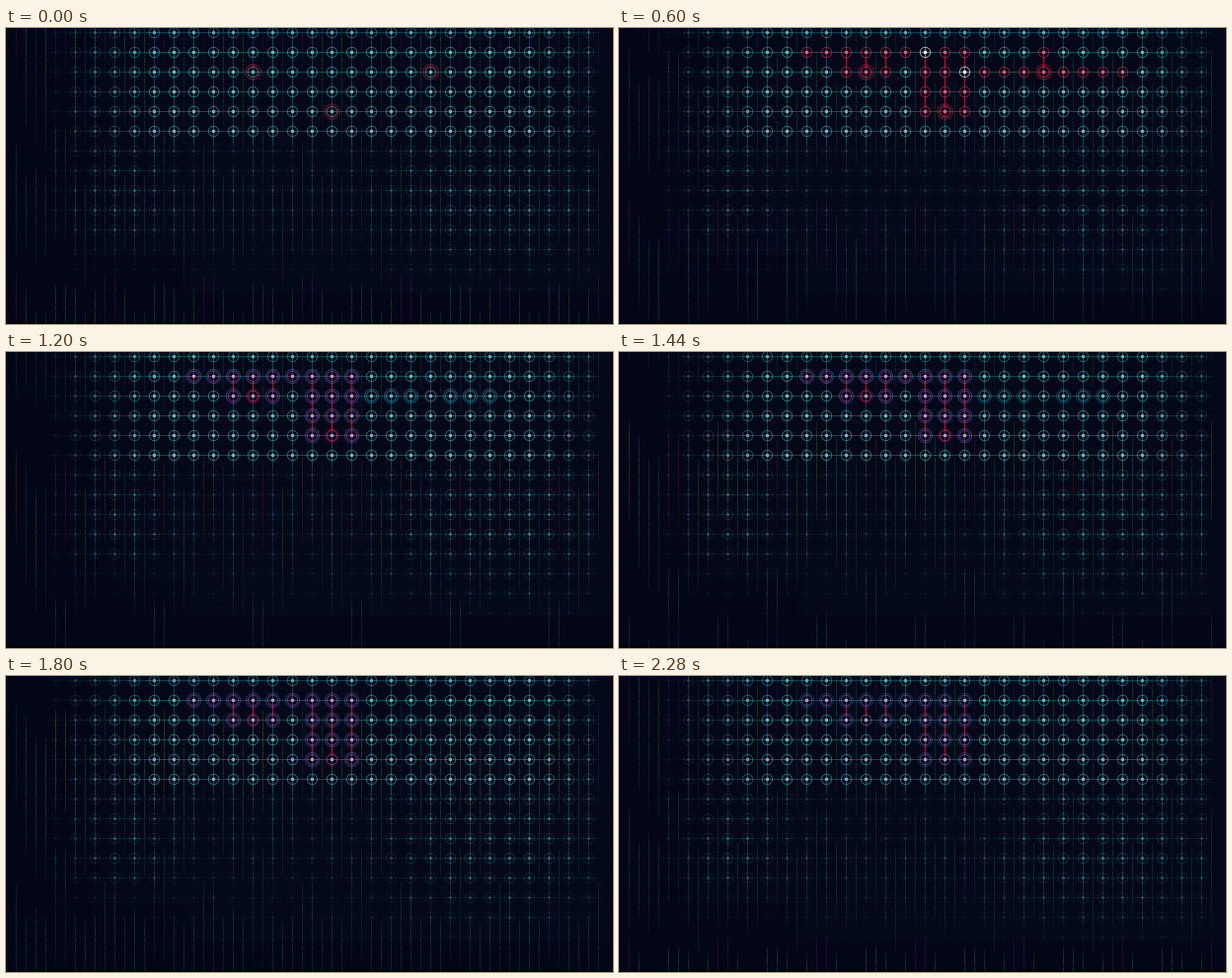
These frames come from a looping animation (984 px wide and 480 px high, 2.4 s). An HTML page with a canvas:

```html
<!DOCTYPE html>
<html lang="en">
<head>
<meta charset="utf-8">
<title>Signal grid</title>
<style>
  html, body { margin: 0; width: 100%; height: 100%; overflow: hidden; background: #030616; }
  canvas { display: block; width: 984px; height: 480px; }
</style>
</head>
<body>
<canvas id="stage" width="984" height="480"></canvas>
<script>
const ctx = document.getElementById('stage').getContext('2d');
const W = 984, H = 480, LOOP = 2400, STEP = 120, CELL = 32;
const TEAL = [34, 178, 178], RED = [226, 36, 78], MAGENTA = [196, 56, 164],
      PURPLE = [136, 100, 178], BLUE = [62, 104, 182], PALE = [134, 182, 204], WHITE = [255, 255, 255];

const clamp = v => Math.max(0, Math.min(1, v));
const ramp = (v, from, to) => clamp((v - from) / (to - from));
const mix = (a, b, u) => a.map((v, i) => v + (b[i] - v) * u);
const rgba = (c, a = 1) => `rgba(${c.map(Math.round).join()},${a})`;
const rowY = row => 7.5 + row * CELL;

function line(g, x1, y1, x2, y2, style, width = 1) {
  g.strokeStyle = style;
  g.lineWidth = width;
  g.beginPath();
  g.moveTo(x1, y1);
  g.lineTo(x2, y2);
  g.stroke();
}

function ring(x, y, r, color, alpha) {
  if (alpha <= 0) return;
  ctx.strokeStyle = rgba(color, alpha);
  ctx.lineWidth = 1;
  ctx.beginPath();
  ctx.arc(x, y, r, 0, 7);
  ctx.stroke();
}

// Brightness of the lattice: strong upper rows, a weak uneven lower part.
function level(x, row) {
  const left = ramp(x, 58, 245), right = 1 - 0.75 * ramp(x, 845, 950);
  if (row < 6) return left ** 1.3 * right * (row ? 1 : 0.85);
  const bump = (center, width) => Math.exp(-(((x - center) / width) ** 2));
  const east = ramp(x, 570, 740) * right;
  const west = row < 11 ? bump(190, 75) : 0;
  const decay = row < 10 ? 1 : [0.7, 0.5, 0.32, 0.12][row - 10];
  return (0.12 + 0.3 * east + 0.18 * west) * decay * ramp(x, 20, 150);
}

function makeBackdrop() {
  const layer = document.createElement('canvas');
  layer.width = W;
  layer.height = H;
  const g = layer.getContext('2d');
  g.fillStyle = '#030616';
  g.fillRect(0, 0, W, H);
  for (let x = 72; x < 980; x += 4) {
    const start = x < 300 ? 0 : 4;
    line(g, x + 0.5, start, x + 0.5, x < 300 ? 370 : 428, rgba([20, 90, 110], 0.07 * ramp(x, 60, 300)));
  }
  for (let y = 3; y < 430; y += 4) {
    line(g, y > 370 ? 290 : 150, y + 0.5, 980, y + 0.5, rgba([20, 90, 110], 0.06));
  }
  for (let x = 80.5; x < 960; x += CELL) {
    for (let row = 0; row < 14; row++) {
      const y = rowY(row), a = level(x, row);
      line(g, x - 16, y, x + 16, y, rgba(TEAL, a * 0.62));
      line(g, x, y - 16, x, y + 16, rgba([16, 140, 158], a * 0.75));
      if (row === 5) line(g, x, y + 16, x, y + 22, rgba([16, 140, 158], a * 0.65));
    }
  }
  g.fillStyle = '#010208';
  g.fillRect(0, 477, W, 3);
  return layer;
}

// Rising streaks by column class: [top, bottom] at 600 ms.
const LEAD = [[280, 385], [280, 385], [305, 460], [340, 495], [340, 500],
              [295, 395], [295, 395], [300, 500], [340, 495], [305, 460]];
const TRAIL = [[35, 225], [35, 225], [90, 210], [75, 235], [90, 225],
               [40, 140], [40, 140], [90, 225], [100, 270], [90, 210]];
const EXTRA = [140, 230];

// Hue keys as [time since 600 ms, hue].
const VIOLET_KEYS = [[-900, 280], [0, 310], [600, 380], [1080, 510], [1320, 640], [2400, 640]];
const ROSE_KEYS = [[-900, 150], [0, 260], [600, 330], [1080, 405], [1440, 480], [1680, 630], [2400, 630]];

function along(keys, t) {
  for (let i = 1; i < keys.length; i++) {
    const [t0, v0] = keys[i - 1], [t1, v1] = keys[i];
    if (t <= t1) return v0 + (v1 - v0) * ramp(t, t0, t1);
  }
  return keys[keys.length - 1][1];
}

function leadHue(kind, dt) {
  if (kind < 2) return along(VIOLET_KEYS, dt);
  if (kind === 5 || kind === 6) return along(ROSE_KEYS, dt);
  const phase = kind === 3 || kind === 8 ? 2 : kind === 2 || kind === 9 ? 0.6 : 0;
  return 178 + 36 * Math.sin(dt / 330 + phase);
}

function streak(x, top, bottom, hue, strength) {
  if (bottom < 0 || top > 478) return;
  const fade = ctx.createLinearGradient(0, top, 0, bottom);
  const tone = a => `hsla(${hue},85%,32%,${a * strength})`;
  fade.addColorStop(0, tone(0.35));
  fade.addColorStop(0.15, tone(0.8));
  fade.addColorStop(0.65, tone(0.65));
  fade.addColorStop(1, tone(0.3));
  line(ctx, x, top, x, Math.min(bottom, 479), fade);
}

function drawRain(t) {
  const since = (t - 600 + LOOP) % LOOP;
  for (let k = 1; k <= 60; k++) {
    const x = k * 16 + 0.5, kind = k % 10;
    ctx.setLineDash([9, 1, 4, 1, 13, 1, 3, 2]);
    for (let turn = -1; turn < 2; turn++) {
      const dt = since + turn * LOOP;
      const stretch = turn ? 0 : 55 * Math.sin(Math.PI * dt / LOOP);
      const [top, bottom] = LEAD[kind];
      streak(x, top - 0.2 * dt, bottom - 0.19 * dt + stretch, leadHue(kind, dt), 0.72);
      const speed = kind === 5 || kind === 6 ? 0.2 : 0.25;
      const [low, high] = TRAIL[kind];
      streak(x, low - speed * dt, high - speed * dt, 168 + 22 * Math.sin(kind * 2 + dt / 500), 0.58);
      if (speed === 0.2) {
        streak(x, EXTRA[0] - speed * dt, EXTRA[1] - speed * dt, 205, 0.55);
      }
    }
  }
  ctx.setLineDash([]);
}

const SEEDS = [[400, 2], [688, 2], [528, 4]];
const isSeed = (x, row) => SEEDS.some(s => s[0] === x && s[1] === row);
const between = (v, a, b) => v >= a && v <= b;

function isHeld(x, row) {
  if (row === 1) return between(x, 304, 560);
  if (row === 2 && between(x, 368, 432)) return true;
  return between(row, 2, 4) && between(x, 496, 560);
}
const isBrief = (x, row) => row === 2 && between(x, 592, 816) || row === 1 && x === 688;
const distance = (x, row) =>
  Math.min(...SEEDS.map(([sx, sr]) => Math.max(Math.abs(x - sx) / CELL, Math.abs(row - sr))));

function drawLinks(t) {
  for (let x = 368; x <= 688; x += CELL) {
    for (let row = 1; row < 4; row++) {
      const held = isHeld(x, row) && isHeld(x, row + 1);
      const brief = x === 688 && row === 1 && t < 900;
      const reach = Math.max(distance(x, row), distance(x, row + 1));
      if ((held || brief) && t >= 120 + reach * 110) {
        line(ctx, x + 0.5, rowY(row) + 8, x + 0.5, rowY(row) + 24, rgba([240, 8, 44]), 1.6);
      }
    }
  }
}

function drawNode(x, y, color, core, alpha) {
  ring(x, y, 8.4, color, alpha);
  line(ctx, x - 8, y, x + 8, y, rgba(color, alpha * 0.6));
  line(ctx, x, y - 8, x, y + 8, rgba(color, alpha * 0.6));
  ctx.fillStyle = rgba(core, alpha * 0.9);
  ctx.fillRect(x - 2.5, y - 2.5, 5, 5);
}

function drawCell(col, row, t) {
  const px = col + 0.5, y = rowY(row), alpha = level(col, row);
  const held = isHeld(col, row), brief = isBrief(col, row), seed = isSeed(col, row);
  let color = TEAL, core = PALE;
  if (held || brief) {
    const d = distance(col, row);
    color = mix(TEAL, RED, ramp(t, 200 + d * 80, 280 + d * 80));
    core = mix(PALE, [246, 96, 134], ramp(t, 120 + d * 80, 360 + d * 80));
    const settle = ramp(t, 720, 1080);
    color = mix(color, held ? MAGENTA : TEAL, settle);
    core = mix(core, held ? [196, 164, 204] : PALE, settle);
    if (held) color = mix(color, PURPLE, ramp(t, 1560, 2280));
    const flash = col === 496 && row === 1 || col === 560 && row === 2;
    if (flash && between(t, 540, 719)) color = core = WHITE;
    if (!seed && held) ring(px, y, 11.3, BLUE, settle * (1 - 0.35 * ramp(t, 1560, 2280)));
    if (!seed && brief && row === 2 && col < 816) {
      ring(px, y, 11.3, [32, 148, 184], settle * (1 - ramp(t, 1200, 1920)) * 0.9);
    }
  }
  drawNode(px, y, color, core, alpha);
  if (seed) {
    const end = held ? 2500 : 1560;
    const strength = 1 - ramp(t, 720, end);
    const shrink = 1.3 * ramp(t, 600, 1080);
    ring(px, y, 12.4 - shrink, [220, 12, 48], strength * 0.95);
    ring(px, y, 9.2, [220, 12, 48], strength * 0.6);
  }
}

const backdrop = makeBackdrop();

function draw(t) {
  ctx.drawImage(backdrop, 0, 0);
  drawRain(t);
  drawLinks(t);
  for (let x = 80; x < 960; x += CELL) {
    for (let row = 0; row < 14; row++) drawCell(x, row, t);
  }
}

let shown = -1;
function tick() {
  const t = Math.floor(performance.now() % LOOP / STEP) * STEP;
  if (t !== shown) draw(shown = t);
  requestAnimationFrame(tick);
}
tick();
</script>
</body>
</html>
```
